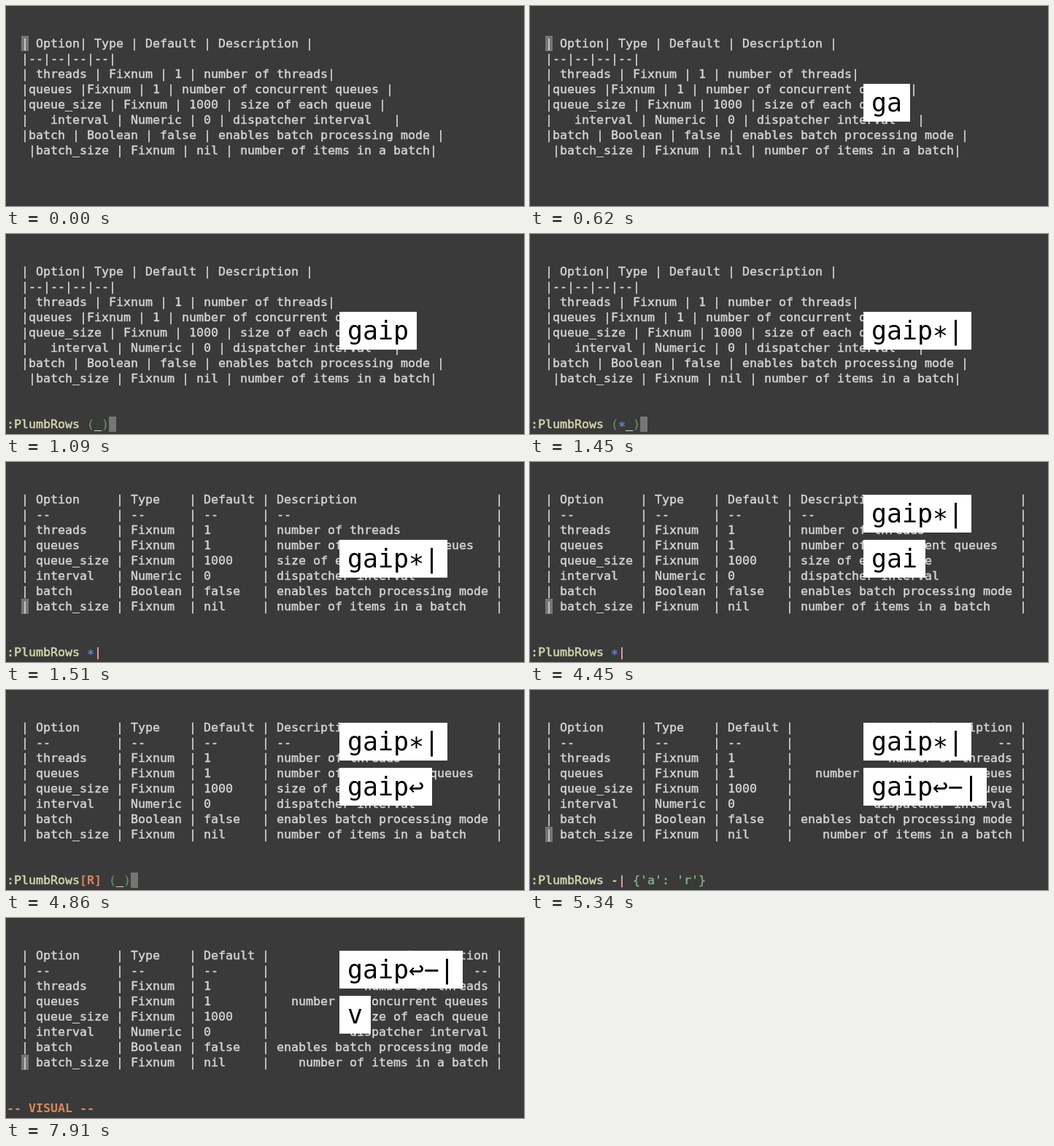
Recreate the animation shown at these times as an HTML page. Size 710 by 275 pixels, loop 8000 ms.

```html
<!DOCTYPE html>
<html lang="en">
<head>
<meta charset="utf-8">
<title>Table alignment</title>
<style>
html, body { margin: 0; width: 100%; height: 100%; overflow: hidden; background: #3a3a3a; }
body { position: relative; font-family: "DejaVu Sans Mono", "Liberation Mono", monospace; }
pre, .keys, #cursor { position: absolute; margin: 0; white-space: pre; font-family: inherit; }
pre { font-size: 16.61px; line-height: 21px; color: #d4d4d4; -webkit-text-stroke: .45px; }
#table { left: 21px; top: 41px; }
#prompt { left: 1px; top: 251px; }
#cursor { width: 10px; height: 21px; background: #767676; }
.keys { left: 457px; height: 52px; padding: 0 11px; background: #fff; color: #000; font-size: 34.88px; line-height: 52px; }
#last { top: 45px; }
#now { top: 107px; }
.keys:empty { display: none; }
.star { position: relative; top: .2em; }
.name { color: #d7d7af; }
.paren { color: #5f875f; }
.all { color: #5f87d7; }
.mark { color: #ffafaf; }
.num { color: #ffd787; }
.opt { color: #87af87; }
.mode { color: #d7875f; font-weight: bold; -webkit-text-stroke: 0; }
</style>
</head>
<body>
<div id="cursor"></div>
<pre id="table"></pre>
<pre id="prompt"></pre>
<div class="keys" id="last"></div>
<div class="keys" id="now"></div>
<script>
const LOOP = 8000;
const $ = id => document.getElementById(id);

const raw = `| Option| Type | Default | Description |
|--|--|--|--|
| threads | Fixnum | 1 | number of threads|
|queues |Fixnum | 1 | number of concurrent queues |
|queue_size | Fixnum | 1000 | size of each queue |
|   interval | Numeric | 0 | dispatcher interval   |
|batch | Boolean | false | enables batch processing mode |
 |batch_size | Fixnum | nil | number of items in a batch|`;

// Pads every column to its widest cell; the last one may be flushed right.
function align(text, lastRight) {
  const rows = text.split('\n').map(r => r.trim().slice(1, -1).split('|').map(c => c.trim()));
  const widths = rows[0].map((_, i) => Math.max(...rows.map(r => r[i].length)));
  const pad = (c, i) => lastRight && i === widths.length - 1 ? c.padStart(widths[i]) : c.padEnd(widths[i]);
  return rows.map(r => '| ' + r.map(pad).join(' | ') + ' |').join('\n');
}
const left = align(raw, false);
const right = align(raw, true);

const tag = (cls, s) => `<span class="${cls}">${s}</span>`;
const star = tag('star', '*');
const name = tag('name', ':PlumbRows');
const bar = tag('mark', '|');
const ask = (typed = '') => tag('paren', '(') + typed + '_' + tag('paren', ')');
const rightMode = name + tag('mode', '[R]') + ' ';
const all = tag('all', star);
const minus = tag('num', '-');

const promptAt = col => [1 + col * 10, 251];
const firstRow = [21, 41], lastRow = [21, 188];

// Each step lists only what changes at that time.
const steps = [
  [0, { table: raw, prompt: '', last: '', now: '', cursor: firstRow }],
  [500, { now: 'g' }],
  [620, { now: 'ga' }],
  [860, { now: 'gai' }],
  [1030, { now: 'gaip' }],
  [1090, { prompt: name + ' ' + ask(), cursor: promptAt(14) }],
  [1210, { now: 'gaip*', prompt: name + ' ' + ask(all), cursor: promptAt(15) }],
  [1450, { now: 'gaip*|' }],
  [1510, { table: left, prompt: name + ' ' + all + bar, cursor: lastRow }],
  [4090, { last: 'gaip*|', now: 'g' }],
  [4270, { now: 'ga' }],
  [4450, { now: 'gai' }],
  [4690, { now: 'gaip', prompt: name + ' ' + ask(), cursor: promptAt(14) }],
  [4860, { now: 'gaip↩', prompt: rightMode + ask(), cursor: promptAt(17) }],
  [5040, { now: 'gaip↩−', prompt: rightMode + ask(minus), cursor: promptAt(18) }],
  [5280, { now: 'gaip↩−|' }],
  [5340, { table: right, prompt: name + ' ' + minus + bar + ' ' + tag('opt', "{'a': 'r'}"), cursor: lastRow }],
  [7910, { last: 'gaip↩−|', now: 'v', prompt: tag('mode', '-- VISUAL --') }]
];

let shown = -1;
function draw(time) {
  const t = time % LOOP;
  const count = steps.filter(([at]) => at <= t).length;
  if (count !== shown) {
    shown = count;
    const s = Object.assign({}, ...steps.slice(0, count).map(step => step[1]));
    $('table').textContent = s.table;
    $('prompt').innerHTML = s.prompt;
    for (const id of ['last', 'now']) $(id).innerHTML = s[id].replace('*', star);
    $('cursor').style.left = s.cursor[0] + 'px';
    $('cursor').style.top = s.cursor[1] + 'px';
  }
}

const start = performance.now();
function tick() {
  draw(performance.now() - start);
  requestAnimationFrame(tick);
}
tick();
</script>
</body>
</html>
```
